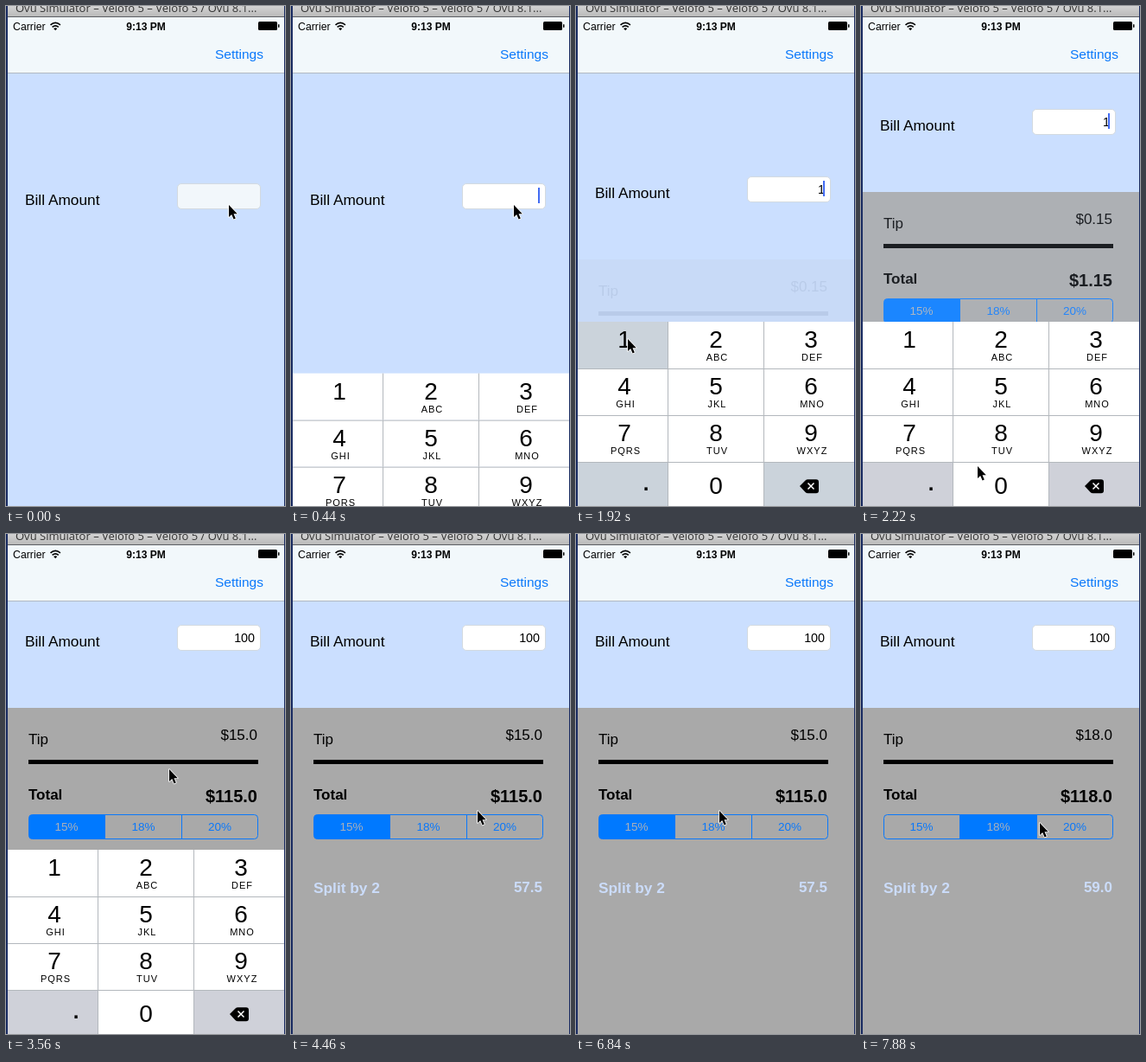
Recreate the animation shown at these times as an HTML page. Size 323 by 578 pixels, loop 8000 ms.

```html
<!DOCTYPE html>
<html lang="en">
<head>
<meta charset="utf-8">
<title>Tip calculator</title>
<style>
  html, body { margin: 0; width: 100%; height: 100%; overflow: hidden; background: #1a2c62; }
  svg { display: block; width: 323px; height: 578px; font-family: "Liberation Sans", Arial, sans-serif; }
  .end { text-anchor: end; }
  .mid { text-anchor: middle; }
  .bold { font-weight: bold; }
  .blue { fill: #0a78fa; }
</style>
</head>
<body>
<svg viewBox="0 0 323 578">
  <defs>
    <linearGradient id="chrome" x2="0" y2="1">
      <stop stop-color="#d2d2d2"/><stop offset="1" stop-color="#bababa"/>
    </linearGradient>
  </defs>
  <rect width="323" height="578" fill="#1a2c62"/>
  <rect x="2" width="320" height="578" fill="#cbdfff"/>

  <!-- bill row -->
  <g id="bill" font-size="17.3">
    <text x="22" y="230.3">Bill Amount</text>
    <rect id="field" x="198.5" y="205.5" width="96" height="29" rx="4.5" stroke="#d3dae0"/>
    <text id="amount" class="end" x="288" y="225" font-size="14.3"></text>
    <rect id="caret" x="286" y="210" width="2" height="18" fill="#426bf2"/>
  </g>

  <!-- results panel, drawn at its resting place -->
  <g id="panel" font-size="17">
    <rect x="2" y="201" width="320" height="480" fill="#a9a9a9"/>
    <text x="26" y="243">Tip</text>
    <text id="tip" class="end" x="291" y="238"></text>
    <rect x="26" y="261" width="266" height="5"/>
    <text x="26" y="307" class="bold">Total</text>
    <text id="total" class="end bold" x="291" y="310" font-size="20"></text>
    <g id="segments" font-size="13.5"></g>
    <g class="bold" fill="#cbdcfa">
      <text x="26" y="415" font-size="17.3">Split by 2</text>
      <text id="split" class="end" x="291" y="414"></text>
    </g>
  </g>

  <!-- keyboard -->
  <g id="keyboard">
    <g id="keys"></g>
    <path d="M259 555l6.5-6.5q1.3-1.3 3-1.3h9.5q3 0 3 3v10q0 3-3 3h-9.5q-1.7 0-3-1.3z"/>
    <path d="M268.5 551.5l7 7m0-7l-7 7" stroke="#fff" stroke-width="1.5"/>
  </g>

  <!-- title, status and navigation bars -->
  <rect x="2" width="320" height="12" fill="url(#chrome)"/>
  <rect x="2" y="12" width="320" height="1" fill="#5c5f63"/>
  <text x="11" y="7" font-size="13" fill="#333" font-family="'Open Sans', sans-serif">Ovu Simulator – Velofo 5 – Velofo 5 / Ovu 8.1...</text>
  <rect x="2" y="13" width="320" height="64" fill="#f2f8fb"/>
  <rect x="2" y="77" width="320" height="1" fill="#b1b9c1"/>
  <text x="8" y="27.5" font-size="12.3">Carrier</text>
  <g fill="none" stroke="#000" stroke-width="1.7">
    <path d="M51.5 21.8q5.7-4.8 11.4 0M53.6 24.3q3.6-3 7.2 0"/>
  </g>
  <path d="M57.2 28.2l-2.1-2.3q2.1-1.5 4.2 0z"/>
  <text x="162" y="27.5" font-size="12" class="mid bold">9:13 PM</text>
  <rect x="292" y="18" width="22" height="10" rx="1.5"/>
  <rect x="315" y="21" width="1.5" height="4" rx=".7"/>
  <text x="298" y="61" font-size="15.5" class="end blue">Settings</text>

  <path id="cursor" d="M0 0v14l3.2-3 2.4 5.4 2.2-1-2.3-5.2h4.3z" stroke="#fff" stroke-width="1.6" stroke-linejoin="round" paint-order="stroke"/>
</svg>
<script>
const LOOP = 8000;
const BEAT = 148.7;      // the screen refreshes once per beat
const LEAD = 14;
const SHIFT = 100;       // how far the form rises once an amount exists
const KEYBOARD_HEIGHT = 213;

const $ = id => document.getElementById(id);

function add(parent, tag, attrs, text = "") {
  const node = document.createElementNS("http://www.w3.org/2000/svg", tag);
  for (const name in attrs) node.setAttribute(name, attrs[name]);
  node.textContent = text;
  return parent.appendChild(node);
}

const GREY_KEY = "#cbd3db";
const KEY_EDGES = [2, 106, 217, 322];
const KEY_CENTERS = [56, 162, 272];
const LABELS = ["1", "2 ABC", "3 DEF", "4 GHI", "5 JKL", "6 MNO", "7 PQRS", "8 TUV", "9 WXYZ", ".", "0", "delete"];
const keyRects = {};

LABELS.forEach((label, i) => {
  const col = i % 3, row = Math.floor(i / 3), keys = $("keys");
  const [digit, letters] = label.split(" ");
  const left = KEY_EDGES[col], top = 365 + 54 * row, center = KEY_CENTERS[col];
  const width = KEY_EDGES[col + 1] - left;
  keyRects[digit] = add(keys, "rect", { x: left, y: top, width, height: 54, fill: "#fff" });
  if (row) add(keys, "rect", { x: left, y: top, width, height: 1, fill: "#b3b8bd" });
  if (col) add(keys, "rect", { x: left, y: top, width: 1, height: 54, fill: "#b3b8bd" });
  if (digit == ".") add(keys, "text", { x: 81, y: 560, class: "mid bold", "font-size": 24 }, digit);
  else if (digit != "delete") add(keys, "text", { x: center, y: row == 3 ? 564 : top + 30, class: "mid", "font-size": 28 }, digit);
  if (letters) add(keys, "text", { x: center + 1.5, y: top + 45, class: "mid", "font-size": 11, "letter-spacing": 1 }, letters);
});

const RATES = [15, 18, 20];
const SEGMENT_SHAPES = [
  "M114.5 324.5H30.5q-4 0-4 4v20q0 4 4 4h84z",
  "M114.5 324.5h89v28h-89z",
  "M203.5 324.5h84q4 0 4 4v20q0 4-4 4h-84z"
];
const segments = RATES.map((rate, i) => ({
  rate,
  box: add($("segments"), "path", { d: SEGMENT_SHAPES[i], stroke: "#0a78fa" }),
  text: add($("segments"), "text", { x: [70, 159, 247.5][i], y: 343, class: "mid" }, rate + "%")
}));

// Each key pose is [beat, ...values]; values between poses are linear.
function track(poses, beat) {
  const next = poses.findIndex(pose => pose[0] > beat);
  if (next == 0) return poses[0].slice(1);
  if (next < 0) return poses[poses.length - 1].slice(1);
  const a = poses[next - 1], b = poses[next];
  const k = (beat - a[0]) / (b[0] - a[0]);
  return a.slice(1).map((v, i) => v + (b[i + 1] - v) * k);
}

const CURSOR = [
  [8, 258, 230], [11, 60, 385], [13, 60, 385], [15, 135, 532], [16, 135, 545], [20, 135, 545],
  [24, 189, 272], [29, 189, 272], [30, 216, 320], [33, 250, 300], [35, 92, 400], [37, 300, 414],
  [40, 270, 256], [43, 158, 352], [45, 158, 352], [46, 166, 320], [47, 164, 325], [48, 164, 325],
  [50, 161, 333], [53, 207, 334]
];
const KEYBOARD_HIDDEN = [
  [1, 1], [2, 0.8], [3, 0.28], [4, 0.05], [5, 0], [25, 0], [26, 0.1], [27, 0.5], [28, 0.9], [29, 1]
];

const easeInOut = k => (1 - Math.cos(Math.PI * Math.min(1, Math.max(0, k)))) / 2;
const during = (beat, from, to) => beat >= from && beat < to;
const move = (id, x, y) => $(id).setAttribute("transform", `translate(${x} ${y})`);

function decimal(value) {
  const rounded = Math.round(value * 100) / 100;
  return Number.isInteger(rounded) ? rounded.toFixed(1) : String(rounded);
}

function draw(beat) {
  const amount = beat < 13 ? 0 : beat < 17 ? 1 : beat < 18 ? 10 : 100;
  const rate = beat < 50 ? 15 : 18;
  const tip = amount * rate / 100;
  const rise = easeInOut((beat - 12.35) / 3.5);
  const lift = Math.round(SHIFT * rise);

  $("amount").textContent = amount || "";
  $("tip").textContent = "$" + decimal(tip);
  $("total").textContent = "$" + decimal(amount + tip);
  $("split").textContent = decimal((amount + tip) / 2);

  move("bill", 0, -lift);
  move("panel", 0, SHIFT - lift);
  $("panel").setAttribute("opacity", rise);
  $("field").setAttribute("fill", beat < 2 ? "#f2f7fb" : "#fff");
  $("caret").setAttribute("opacity", during(beat, 2, 7) || during(beat, 9, 21) ? 1 : 0);

  for (const { rate: option, box, text } of segments) {
    const selected = option == rate;
    box.setAttribute("fill", selected ? "#0079ff" : "none");
    text.setAttribute("fill", selected ? "#a9b0ba" : "#0a78fa");
  }

  // The grey keys are translucent and pick up the colour behind them.
  const greyKey = rise > 0.5 ? "#cfd1d9" : GREY_KEY;
  move("keyboard", 0, KEYBOARD_HEIGHT * track(KEYBOARD_HIDDEN, beat)[0]);
  keyRects["1"].setAttribute("fill", during(beat, 12, 14) ? greyKey : "#fff");
  keyRects["0"].setAttribute("fill", during(beat, 17, 19) ? greyKey : "#fff");
  keyRects["."].setAttribute("fill", greyKey);
  keyRects.delete.setAttribute("fill", greyKey);

  move("cursor", ...track(CURSOR, beat));
}

const start = performance.now();
function tick() {
  const time = (performance.now() - start) % LOOP;
  draw(Math.floor((time + LEAD) / BEAT));
  requestAnimationFrame(tick);
}
tick();
</script>
</body>
</html>
```
